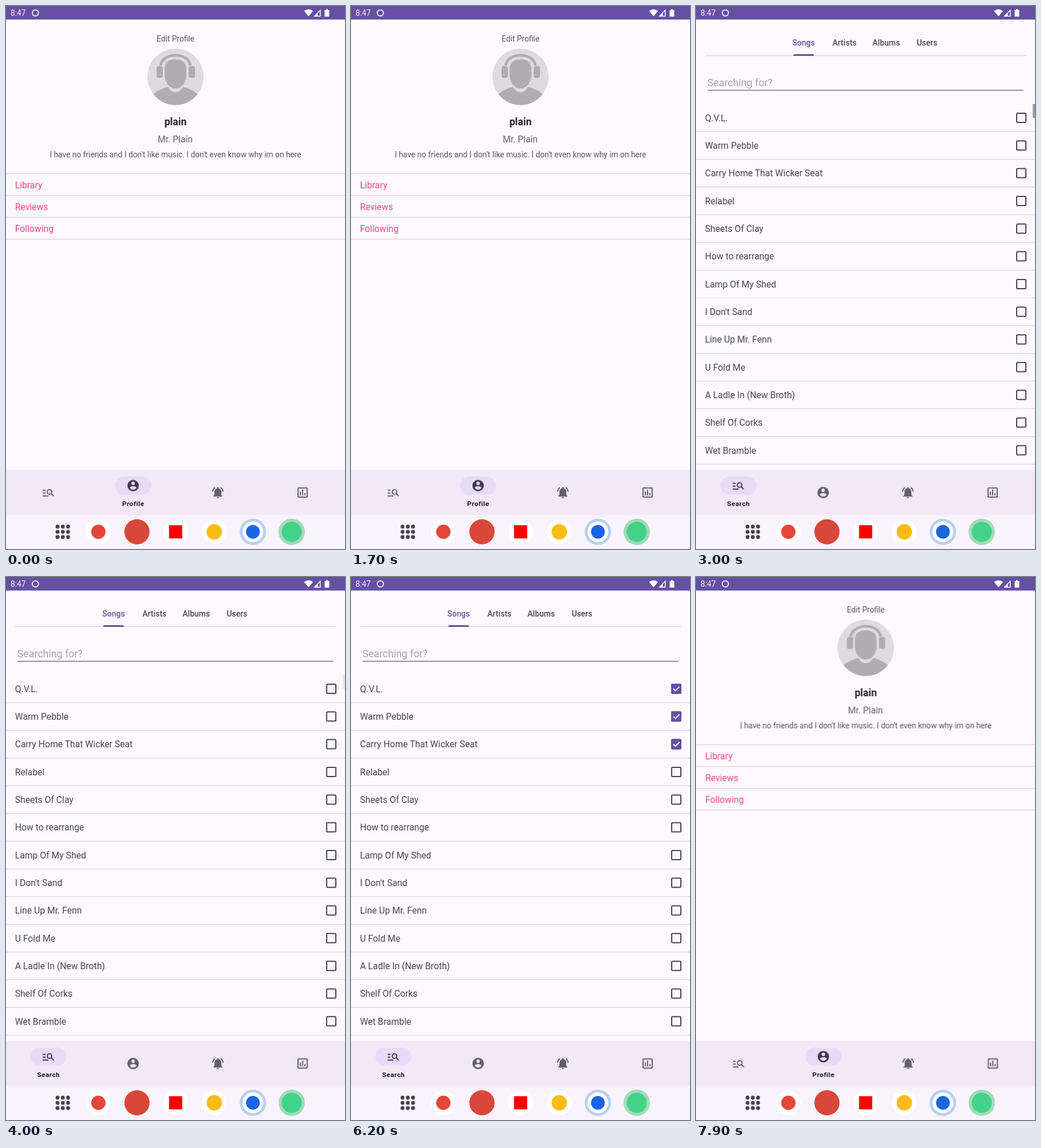
Write an HTML page that moves like this. It is 592 by 947 pixels and loops after 8 s.

```html
<!DOCTYPE html>
<html lang="en">
<head>
<meta charset="utf-8">
<title>Music profile</title>
<style>
html, body { margin: 0; width: 100%; height: 100%; overflow: hidden; background: #fef8ff; }
svg { display: block; width: 592px; height: 947px; font-family: Roboto, "Open Sans", sans-serif; }
.mid { text-anchor: middle; }
.f14 { font-size: 13.75px; }
.f16 { font-size: 15.75px; }
.tab { font-size: 13.8px; font-weight: 500; letter-spacing: .1px; fill: #49454f; }
.label { font-size: 11.8px; font-weight: 700; letter-spacing: .5px; fill: #1d1b20; }
.rule { stroke: #dfd8e1; stroke-width: 1.3; }
.pill, .wave { transform-box: fill-box; transform-origin: center; }
.anim { animation: 8s linear infinite; }
</style>
</head>
<body>
<svg id="stage" viewBox="0 0 592 947"></svg>
<script>
const LOOP = 8000;
const OPEN = 2560, BACK = 7550;
const DARK = '#49454f', DIM = '#635e69', PURPLE = '#674fa3', BG = '#fef8ff';
const songs = ['Q.V.L.', 'Warm Pebble', 'Carry Home That Wicker Seat', 'Relabel', 'Sheets Of Clay',
  'How to rearrange', 'Lamp Of My Shed', 'I Don\'t Sand', 'Line Up Mr. Fenn', 'U Fold Me',
  'A Ladle In (New Broth)', 'Shelf Of Corks', 'Wet Bramble'];
const checkTimes = [4000, 4800, 5700, 6500];

let css = '';
// Registers keyframes given as [ms, declarations]; end states are held.
function kf(name, ...steps) {
  const all = [[0, steps[0][1]], ...steps, [LOOP, steps[steps.length - 1][1]]];
  css += `@keyframes ${name}{${all.map(([t, s]) => `${t / LOOP * 100}%{${s}}`).join('')}}`;
  return `class="anim" style="animation-name:${name}"`;
}
const named = (cls, attr) => attr.replace('anim', 'anim ' + cls);

// Window slide: quick start, long settling.
function slide(t, from, to) {
  const at = k => `transform:translateX(${from + (to - from) * k}px);`;
  return [
    [t, at(0) + 'animation-timing-function:cubic-bezier(.3,0,.8,.15)'],
    [t + 75, at(.4) + 'animation-timing-function:cubic-bezier(.05,.7,.1,1)'],
    [t + 450, at(1)]
  ];
}
const fadeIn = t => [[t + 50, 'opacity:0'], [t + 133, 'opacity:1']];

const text = (x, y, s, cls, fill = DARK, extra = '') =>
  `<text x="${x}" y="${y}" class="${cls}" fill="${fill}" ${extra}>${s}</text>`;
const rule = y => `<path class="rule" d="M-60 ${y}H652"/>`;
const disc = (x, y, r, fill) => `<circle cx="${x}" cy="${y}" r="${r}" fill="${fill}"/>`;
const box = (x, y, w, h, fill, r = 0, extra = '') =>
  `<rect x="${x}" y="${y}" width="${w}" height="${h}" rx="${r}" fill="${fill}" ${extra}/>`;

const icons = [
  `<g fill="none" stroke="currentColor" stroke-width="2"><path d="M-10-4h5M-10 1h5M-10 6H0M4.5 1.500l4.800 4.800"/><circle cx="2" cy="-1" r="4"/></g>`,
  `<path fill="currentColor" fill-rule="evenodd" d="M-10 0a10 10 0 0 1 20 0a10 10 0 0 1-20 0ZM-3-4a3 3 0 0 0 6 0a3 3 0 0 0-6 0ZM-6 4Q0 10.400 6 4Q5 1 0 .9Q-5 1-6 4Z"/>`,
  `<path fill="currentColor" d="M-6-1Q-6-6.300-1.500-7.300V-8a1.500 1.500 0 0 1 3 0V-7.300Q6-6.300 6-1V4L8 6V7H-8V6L-6 4ZM-2 8H2A2 2 0 0 1-2 8Z"/><path fill="none" stroke="currentColor" stroke-width="2" d="M-9-1.500Q-8.700-6-5.200-8.600M9-1.500Q8.700-6 5.200-8.600"/>`,
  `<path fill="none" stroke="currentColor" stroke-width="2" d="M-7-8H7Q8 -8 8-7V7Q8 8 7 8H-7Q-8 8-8 7V-7Q-8-8-7-8ZM-4-2V5M0-5V5M4 1V5"/>`
];
const labels = ['Search', 'Profile', '', ''];

// Navigation bar: item `a` is selected, `b` takes over at time t.
function nav(id, a, b, t) {
  const item = (icon, i) => {
    const on = i === a, goes = b !== undefined && (on || i === b);
    const swap = (part, off, set, start = t, d = 90) => {
      const [s, e] = on ? [set, off] : [off, set];
      return goes ? kf(`${id}${part}${i}`, [start, s], [start + d, e]) : `class="" style="${s}"`;
    };
    const put = (cls, attr) => goes ? named(cls, attr) : attr.replace('class=""', `class="${cls}"`);
    if (!on && !goes) return `<g transform="translate(${74 + 148 * i} 848.5)" color="${DIM}">${icons[i]}</g>`;
    const wave = i === b ? box(-31.5, -16, 63, 32, '#1d1b20', 16, kf(`${id}wave`,
      [t - 110, 'opacity:0'], [t - 30, 'opacity:.12'], [t + 10, 'opacity:.12'],
      [t + 180, 'opacity:.04'], [t + 300, 'opacity:0'])) : '';
    return `<g transform="translate(${74 + 148 * i} 848.5)">
      <g ${swap('move', 'transform:translateY(0px)', 'transform:translateY(-12px)')}>
        ${box(-31.5, -16, 63, 32, '#e7dcf7', 16, put('pill', swap('pill', 'opacity:0;transform:scaleX(.4)', 'opacity:1;transform:scaleX(1)')))}
        ${wave}
        <g ${swap('tint', 'color:' + DIM, 'color:#403b47', t - 60, 40)}>${icons[i]}</g>
      </g>
      <g ${swap('name', 'opacity:0', 'opacity:1')}>${text(.2, 23.5, labels[i], 'mid label')}</g>
    </g>`;
  };
  return box(-60, 809, 712, 79, '#f1e9f7') + icons.map((_, i) => item(icons[i], i)).join('');
}

const avatar = `<clipPath id="round"><circle cx="296" cy="123.500" r="49.200"/></clipPath>
  <g clip-path="url(#round)" fill="#afadb0">${disc(296, 123.5, 49.2, '#dddbde')}
  <path d="M277 110C277 98 285 93 296 93S315 98 315 110V120C315 134 306 144 296 144S277 134 277 120Z"/>
  <path d="M256 156Q262 147 283 141Q287 150 296 150.500Q305 150 309 141Q330 147 336 156V175H256Z"/>
  ${box(263, 104.5, 11, 21, '#afadb0', 4)}${box(319, 104.5, 11, 21, '#afadb0', 4)}
  <path d="M270 104C273 80 319 80 322 104" fill="none" stroke="#afadb0" stroke-width="4.500"/></g>`;

const profile = () => box(-60, 23, 712, 865, BG) + avatar
  + text(296, 62.3, 'Edit Profile', 'mid f14', '#5a565e')
  + text(296, 208, 'plain', 'mid', '#27242a', 'font-size="17.700" font-weight="700"')
  + text(295.5, 237.6, 'Mr. Plain', 'mid f16', '#66626a')
  + text(296, 264.3, 'I have no friends and I don\'t like music. I don\'t even know why im on here', 'mid f14', '#5a565e')
  + ['Library', 'Reviews', 'Following'].map((s, i) => text(15.7, 318 + 38 * i, s, 'f16', '#df4a86')).join('')
  + [0, 1, 2, 3].map(i => rule(292.5 + 38 * i)).join('');

function checkbox(y, i) {
  const t = checkTimes[i];
  const empty = box(560, y - 8, 16, 16, 'none', 1.5, `stroke="${DARK}" stroke-width="2"`);
  if (!t) return empty;
  const wave = named('wave', kf('touch' + i,
    [t - 80, 'opacity:0;transform:scale(.4)'], [t + 100, 'opacity:.08;transform:scale(1)'],
    [t + 260, 'opacity:.08;transform:scale(1)'], [t + 450, 'opacity:0;transform:scale(1)']));
  const tick = kf('tick' + i, [t, 'opacity:0'], [t + 90, 'opacity:1']);
  return `<circle cx="568" cy="${y}" r="19.500" fill="${PURPLE}" ${wave}/>${empty}
    <g ${tick}>${box(559, y - 9, 18, 18, PURPLE, 2)}
    <path d="M563 ${y}l3.500 3.500l7-7" fill="none" stroke="#fff" stroke-width="2"/></g>`;
}

function search() {
  const rows = songs.map((s, i) => {
    const y = 194.9 + 48.33 * i;
    return text(15.7, y + 5.7, s, 'f16') + rule(y + 24.2) + checkbox(y, i);
  }).join('');
  const tabs = [['Songs', 188], ['Artists', 259.3], ['Albums', 332.2], ['Users', 403.5]]
    .map(([s, x], i) => text(x, 68.6, s, 'mid tab', DARK, i ? '' : `style="fill:${PURPLE}"`)).join('');
  const bar = kf('bar', [3800, 'opacity:1'], [4050, 'opacity:0'], [6900, 'opacity:0'], [6950, 'opacity:1']);
  return box(-60, 23, 712, 865, BG) + tabs
    + '<path class="rule" d="M16 86.500H576"/>'
    + `<path d="M170 87V86Q170 84 172 84H204Q206 84 206 86V87Z" fill="${PURPLE}"/>`
    + text(19.8, 139.6, 'Searching for?', '', '#a7a2aa', 'font-size="17.800"')
    + '<path d="M20 147H572" stroke="#77727b" stroke-width="1.500"/>'
    + rows + box(588, 171, 4, 24.5, '#9f9aa2', 0, bar);
}

const status = box(0, 0, 592, 23.6, PURPLE)
  + text(8, 17.3, '8:47', 'f14', '#f6f0fc')
  + `<circle cx="51.300" cy="12" r="5.400" fill="none" stroke="#f6f0fc" stroke-width="1.800"/>
  <g fill="#fff"><path d="M520.500 8.800Q528.300 2.800 536 8.800L528.300 18Z"/>
  <path d="M549.500 5.500V18.500H537ZM548 9L544.500 12.700V17H548Z" fill-rule="evenodd"/>
  <path d="M559 5.500H562V7H564.500V18.500H556.500V7H559Z"/></g>`;

const dots = [0, 1, 2, 3, 4, 5, 6, 7, 8]
  .map(i => disc(90 + i % 3 * 9.2, 908 + Math.floor(i / 3) * 9.1, 3.4, '#46424a')).join('');
const dock = box(0, 888, 592, 59, '#f9f3fc') + dots
  + [161.3, 296.2, 363.7].map(x => disc(x, 917, 21.6, '#fff')).join('')
  + disc(161.3, 917, 12.5, '#e6463a')
  + disc(228.7, 917, 22, '#d9483b')
  + box(284.7, 905.5, 23, 23, '#f00')
  + disc(363.7, 917, 13.5, '#f9bc15')
  + disc(431.2, 917, 23, '#b9cff4') + disc(431.2, 917, 18, '#fff') + disc(431.2, 917, 12, '#1a66e0')
  + disc(499, 917, 23, '#a3dab9') + disc(499, 917, 17.6, '#43d388');

const moved = (id, inner, ...steps) => `<g ${kf(id, ...steps)}>${inner}</g>`;
document.getElementById('stage').innerHTML =
  moved('leave', profile() + nav('first', 1, 0, 2420), ...slide(OPEN, 0, -59))
  + moved('show', moved('list', search() + nav('second', 0, 1, 7510),
      ...slide(OPEN, 59, 0), ...slide(BACK, 0, -59)), ...fadeIn(OPEN))
  + moved('reshow', moved('back', profile() + nav('third', 1), ...slide(BACK, 59, 0)), ...fadeIn(BACK))
  + status + dock;

const sheet = document.createElement('style');
sheet.textContent = css;
document.head.append(sheet);
</script>
</body>
</html>
```
